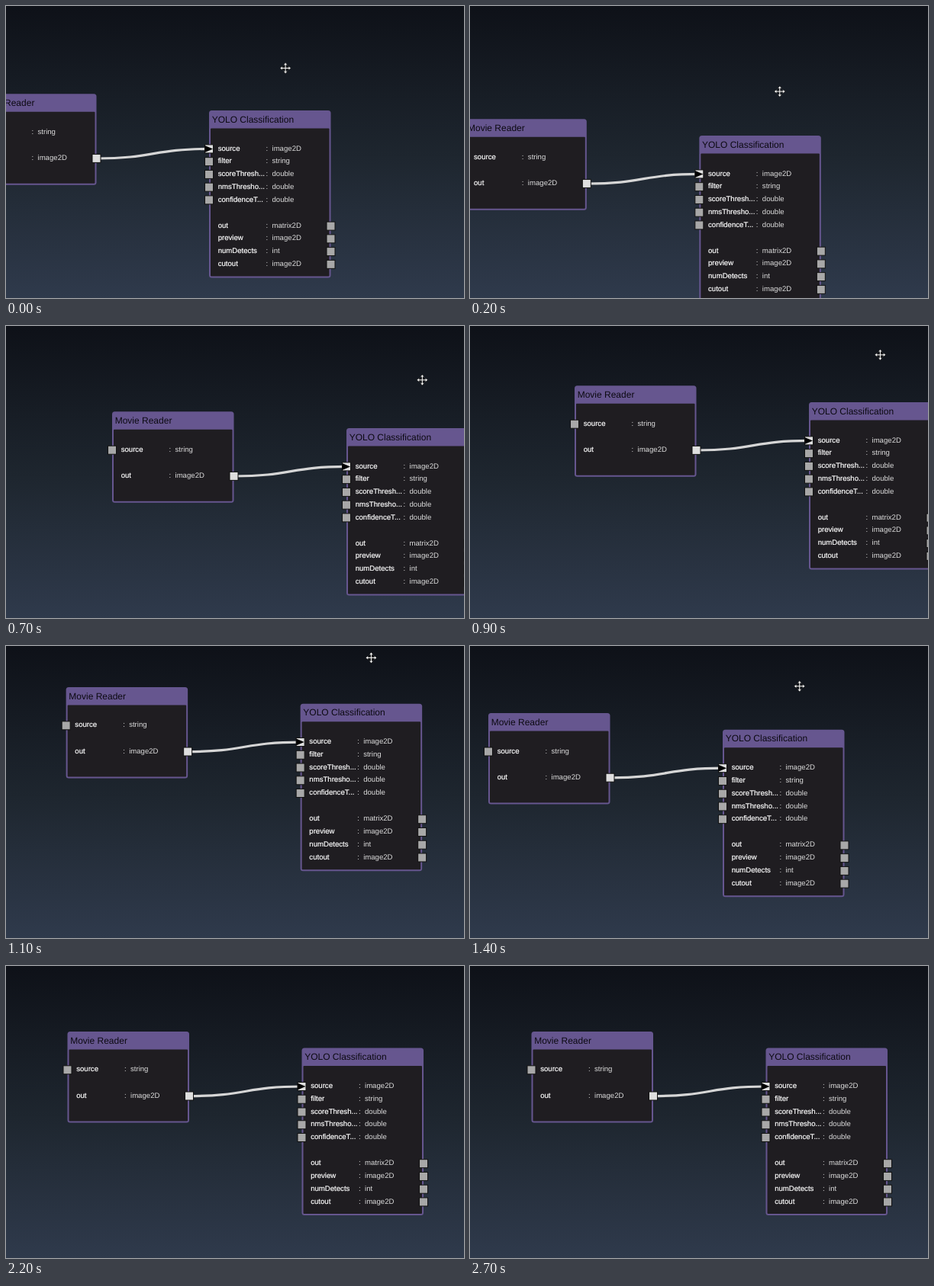
An HTML page for the animation above (2800 ms loop, 600 px wide and 383 px high).

```html
<!DOCTYPE html>
<html lang="en">
<head>
<meta charset="utf-8">
<title>Dragging a node graph</title>
<style>
  html, body { margin: 0; width: 100%; height: 100%; overflow: hidden; background: #0e1118; }
  svg { display: block; width: 600px; height: 383px; background: linear-gradient(#0e1118, #1e262f 52%, #2f3a4c); }
  text { font: 9.6px "Liberation Sans", Arial, sans-serif; fill: #dcdcdc; text-rendering: geometricPrecision; }
  .title { font-size: 12px; fill: #0c0a12; }
  .name { fill: #fff; stroke: #fff; stroke-width: .2; }
  .port { fill: #a8a8a8; stroke: #111; }
  .linked { fill: #dedede; }
  .wire { fill: none; stroke: #d6d6d6; stroke-width: 3.2; }
</style>
</head>
<body>
<svg viewBox="0 0 600 383">
  <g id="graph"></g>
  <g id="cursor">
    <path d="M-5 0H5M0-5V5" stroke="#111" stroke-width="2.4"/>
    <path id="heads" fill="#fff" stroke="#111" stroke-width=".6"/>
    <path d="M-5 0H5M0-5V5" stroke="#fff"/>
  </g>
</svg>
<script>
const graph = document.getElementById('graph');
const cursor = document.getElementById('cursor');
const WIDTH = 159.5, ROW = 16.75, FIRST_ROW = 49.4, OUTPUT_GAP = 34.2;
const READER = [-307, -21.7];

const text = (x, y, label, cls = '') => `<text x="${x}" y="${y}" class="${cls}">${label}</text>`;
const port = (x, y, linked) =>
  `<rect x="${x - 5.5}" y="${y - 5.5}" width="11" height="11" class="port ${linked ? 'linked' : ''}"/>`;

function row([name, type, linked], y, portX) {
  return text(11.7, y + 3.1, name, 'name') + text(74.5, y + 3.1, ':') +
    text(82.5, y + 3.1, type) + port(portX, y + 1, linked);
}

function node([x, y], height, title, inputs, outputs) {
  const firstOutput = FIRST_ROW + (inputs.length - 1) * ROW + OUTPUT_GAP;
  return `<g transform="translate(${x} ${y})">
    <rect width="${WIDTH}" height="${height}" rx="3.5" fill="#66568f"/>
    <rect x="2" y="23.5" width="${WIDTH - 4}" height="${height - 25.5}" rx="1" fill="#1f1d21"/>
    ${text(3.7, 15.7, title, 'title')}
    ${inputs.map((r, i) => row(r, FIRST_ROW + i * ROW, 0)).join('')}
    ${outputs.map((r, i) => row(r, firstOutput + i * ROW, WIDTH)).join('')}
  </g>`;
}

graph.innerHTML =
  '<path class="wire" d="M-147.5 63C-73 63 -73 50.4 0 50.4"/>' +
  node(READER, 119.5, 'Movie Reader', [['source', 'string']], [['out', 'image2D', true]]) +
  node([0, 0], 219.5, 'YOLO Classification',
    [['source', 'image2D', true], ['filter', 'string'], ['scoreThresh...', 'double'],
     ['nmsThresho...', 'double'], ['confidenceT...', 'double']],
    [['out', 'matrix2D'], ['preview', 'image2D'], ['numDetects', 'int'], ['cutout', 'image2D']]) +
  '<path d="M-5.5 45.9L5 50.4L-5.5 54.9Z" fill="#000"/>';

const head = 'M0-7.2L2.6-4H-2.6Z';
document.getElementById('heads').setAttribute('d',
  head + 'M0 7.2L2.6 4H-2.6ZM-7.2 0L-4 2.6V-2.6ZM7.2 0L4 2.6V-2.6Z');

// The drag follows a smooth curve through a few points, sampled ten times a second.
const STEP = 100, LOOP = 2800, LAST_CURSOR_STEP = 20;
const GRIP = [98.5, -59.5], LEAD = 0.2;
const keys = [
  { t: 0, p: [266, 137] }, { t: 1, p: [274, 157] }, { t: 3, p: [335, 178] },
  { t: 5, p: [432.7, 171.3] }, { t: 7, p: [446, 134] }, { t: 9, p: [444, 100] },
  { t: 12, p: [357, 72] }, { t: 14, p: [331, 109.8] }, { t: 17, p: [377, 135.2] },
  { t: 19, p: [387.5, 107.6] }
];

function slope(i, axis) {
  if (i === keys.length - 1) return 0;
  const a = keys[Math.max(i - 1, 0)], b = keys[i + 1];
  return (b.p[axis] - a.p[axis]) / (b.t - a.t);
}

function position(step) {
  const t = Math.min(step, keys.at(-1).t);
  const i = Math.max(1, keys.findIndex(k => k.t >= t));
  const a = keys[i - 1], b = keys[i], span = b.t - a.t, u = (t - a.t) / span;
  const ease = u * u * (3 - 2 * u);
  return [0, 1].map(axis =>
    a.p[axis] + (b.p[axis] - a.p[axis]) * ease +
    span * u * (1 - u) * (slope(i - 1, axis) * (1 - u) - slope(i, axis) * u));
}

function place(element, [x, y]) {
  element.setAttribute('transform', `translate(${x} ${y})`);
}

function draw(now) {
  const step = Math.floor(now % LOOP / STEP);
  const here = position(step), next = position(step + 1);
  place(graph, here);
  // The graph lags a little behind the pointer that drags it.
  place(cursor, here.map((v, axis) => v + GRIP[axis] + LEAD * (next[axis] - v)));
  cursor.style.display = step <= LAST_CURSOR_STEP ? '' : 'none';
}

const start = performance.now();
function tick() {
  draw(performance.now() - start);
  requestAnimationFrame(tick);
}
tick();
</script>
</body>
</html>
```
